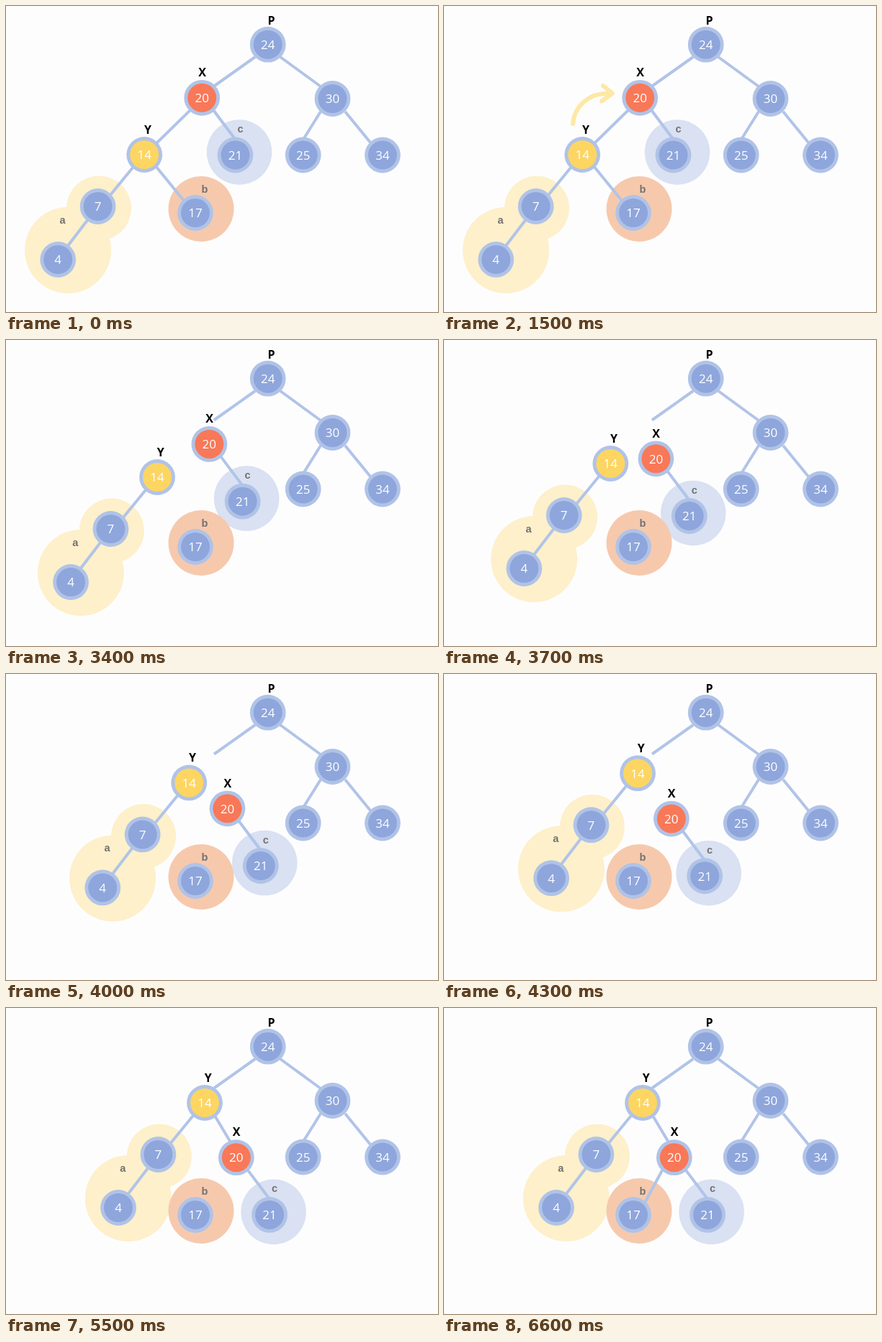
An HTML page for the animation above (7000 ms loop, 600 px wide and 426 px high).

```html
<!DOCTYPE html>
<html lang="en">
<head>
<meta charset="utf-8">
<title>Tree rotation</title>
<style>
  html, body { margin: 0; width: 100%; height: 100%; overflow: hidden; background: #fefdfe; }
  svg { display: block; width: 600px; height: 426px; }
  text { text-anchor: middle; }
  .num { font: 400 17px "Open Sans", "Noto Sans", sans-serif; fill: #fff; }
  .name { font: 700 16px "Open Sans", "Noto Sans", sans-serif; fill: #000; }
  .sub { font: 700 14.5px "Liberation Sans", Arial, sans-serif; fill: #737070; }
  .edge { stroke: #b1c4e8; stroke-width: 4; }
  .arrow { fill: none; stroke: #fee8a5; stroke-width: 6; stroke-linecap: round; stroke-linejoin: round; }
</style>
</head>
<body>
<svg id="stage" viewBox="0 0 600 426"></svg>
<script>
const LOOP = 7000, STEP = 100;
const BLUE = '#8ea6db', RING = '#b0c3e7', RED = '#f87858', GOLD = '#fdd562';
const stage = document.getElementById('stage');

function add(parent, tag, attrs = {}, text) {
  const el = document.createElementNS('http://www.w3.org/2000/svg', tag);
  for (const key in attrs) el.setAttribute(key, attrs[key]);
  if (text !== undefined) el.textContent = text;
  return parent.appendChild(el);
}
const group = () => add(stage, 'g');
const disk = (g, cx, cy, r, fill) => add(g, 'circle', { cx, cy, r, fill });
const edge = (g, x1, y1, x2, y2) => add(g, 'line', { class: 'edge', x1, y1, x2, y2 });
const label = (g, kind, x, y, text) => add(g, 'text', { class: kind, x, y }, text);
function node(g, x, y, value, fill = BLUE) {
  disk(g, x, y, 24.9, RING);
  disk(g, x, y, 20, fill);
  label(g, 'num', x, y + 6.3, value);
}

// Layers from back to front
const fixed = group(), left = group(), right = group(), middle = group(), links = group();
const leftTop = group(), rightTop = group(), middleTop = group();

// Parent and its right side
edge(fixed, 346, 71, 289, 111.5);
edge(fixed, 381, 71, 437, 112);
edge(fixed, 437, 147, 414, 184);
edge(fixed, 471, 147, 506, 190);
node(fixed, 363.7, 53.7, 24);
node(fixed, 453.5, 129, 30);
node(fixed, 412.7, 207.5, 25);
node(fixed, 523, 207.5, 34);
label(fixed, 'name', 368.5, 26, 'P');

// Y with subtree a
disk(left, 86, 340, 60, '#fdf0ca');
disk(left, 129, 281.5, 45, '#fdf0ca');
edge(leftTop, 176, 225, 145, 263);
edge(leftTop, 114, 297, 85, 335);
node(leftTop, 192.2, 207, 14, GOLD);
node(leftTop, 127.6, 279, 7);
node(leftTop, 72.2, 353, 4);
label(leftTop, 'name', 197, 178, 'Y');
label(leftTop, 'sub', 78.5, 303, 'a');

// X with subtree c
disk(right, 324, 203.5, 45.3, '#d9e1f2');
edge(rightTop, 288, 145, 318, 185);
node(rightTop, 272.2, 127.8, 20, RED);
node(rightTop, 318.5, 207.5, 21);
label(rightTop, 'name', 272.5, 98, 'X');
label(rightTop, 'sub', 325.5, 176, 'c');

// Subtree b
disk(middle, 271, 282.5, 45.5, '#f6c9ad');
node(middleTop, 263, 288, 17);
label(middleTop, 'sub', 276, 259.5, 'b');

// Links that break and form
const oldLinks = [edge(links, 256, 145, 209, 191), edge(links, 208, 223, 247, 271)];
const newYX = edge(links, 290, 150, 312, 187);
const newXB = edge(links, 303, 226, 279, 271);

const arrow = add(stage, 'g', { class: 'arrow' });
add(arrow, 'path', { d: 'M179 164C181 139 203 119 232 122' });
add(arrow, 'path', { d: 'M221 111L234 121.5L219 132.5' });

const ramp = (t, from, to) => Math.min(1, Math.max(0, (t - from) / (to - from)));
const easeInOut = u => u < .5 ? 2 * u * u : 1 - 2 * (1 - u) ** 2;
const fade = (el, value) => el.setAttribute('opacity', value);
const shift = (els, x, y) => els.forEach(el => el.setAttribute('transform', `translate(${x} ${y})`));

function render(time) {
  const t = Math.floor(time % LOOP / STEP) * STEP;
  const move = easeInOut(ramp(t, 2775, 4690));
  shift([left, leftTop], 83.8 * move, -75 * move);
  shift([right, rightTop], 47.6 * move, 80.4 * move);
  fade(arrow, ramp(t, 1000, 1400) * (1 - ramp(t, 1500, 1850)));
  oldLinks.forEach(el => fade(el, 1 - ramp(t, 2650, 3250)));
  fade(newYX, ramp(t, 5000, 5500));
  fade(newXB, ramp(t, 5700, 6200));
}

const start = performance.now();
function tick() {
  render(performance.now() - start);
  requestAnimationFrame(tick);
}
tick();
</script>
</body>
</html>
```
